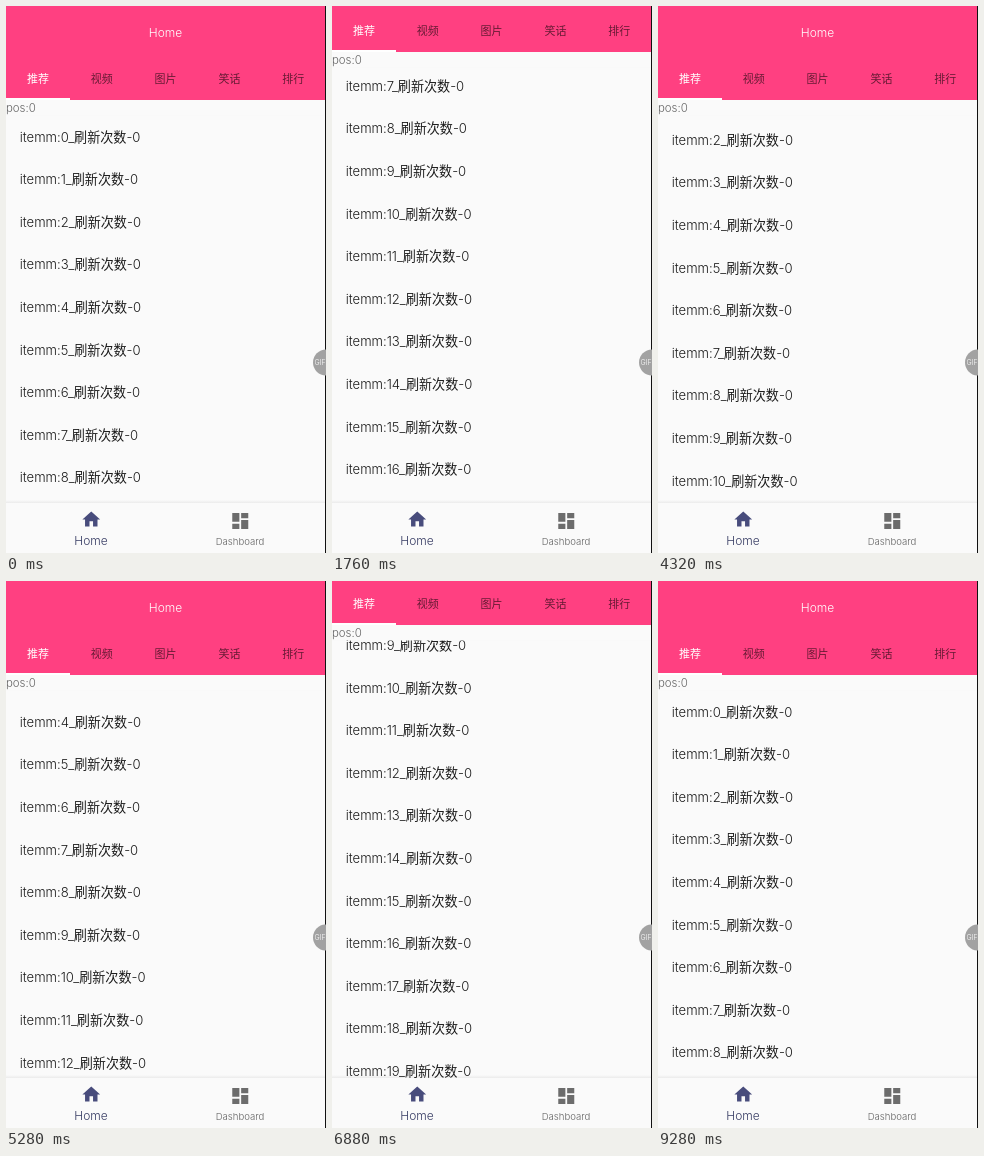
Write an HTML page that moves like this. It is 320x547 px and loops after 9600 ms.

```html
<!DOCTYPE html>
<html lang="zh-CN">
<head>
<meta charset="utf-8">
<title>Home</title>
<style>
  html, body { margin: 0; width: 100%; height: 100%; overflow: hidden; background: #fafafa; }
  svg { display: block; width: 100vw; height: 100vh; }
  text { font-family: Inter, "Noto Sans CJK SC", "Noto Sans CJK", sans-serif; font-weight: 300; white-space: pre; }
  .mid { text-anchor: middle; }
  #tabs text { font-weight: 400; fill: rgba(0, 0, 0, .6); }
  #tabs text:first-child { fill: #fff; }
</style>
</head>
<body>
<svg viewBox="0 0 320 547">
  <defs>
    <linearGradient id="shade" x2="0" y2="1">
      <stop offset="0" stop-color="#000" stop-opacity="0"/>
      <stop offset="1" stop-color="#000" stop-opacity=".06"/>
    </linearGradient>
  </defs>
  <rect width="320" height="547" fill="#fafafa"/>
  <g id="list" font-size="13.1" fill="#1c1c1c"></g>

  <g id="header">
    <rect y="90" width="319" height="19.5" fill="#fafafa"/>
    <text x="0" y="105.8" font-size="11.4" fill="#666">pos:0</text>
    <rect width="319" height="94" fill="#ff4081"/>
    <text class="mid" x="159.5" y="31" font-size="12" fill="#fff">Home</text>
    <g id="tabs" class="mid" font-size="11"></g>
    <rect y="92" width="64" height="2" fill="#fff"/>
  </g>

  <rect y="494" width="319" height="3" fill="url(#shade)"/>
  <rect y="497" width="319" height="50" fill="#fafafa"/>
  <g transform="translate(74.6 502.8) scale(.889)" fill="#484c7c">
    <path d="M10 20v-6h4v6h5v-8h3L12 3 2 12h3v8z"/>
  </g>
  <text class="mid" x="85" y="538.7" font-size="12" fill="#353a62">Home</text>
  <g transform="translate(223.6 504.3) scale(.889)" fill="#6c6c6c">
    <path d="M3 13h8V3H3v10zm0 8h8v-6H3v6zm10 0h8V11h-8v10zm0-18v6h8V3h-8z"/>
  </g>
  <text class="mid" x="234" y="538.6" font-size="9.6" fill="#666">Dashboard</text>

  <rect x="319" width="1" height="547" fill="#111"/>
  <circle cx="320" cy="356.5" r="13" fill="#a2a2a2"/>
  <text x="308.5" y="359" font-size="7" fill="#fff">GIF</text>
</svg>
<script>
const LOOP = 9600, STEP = 160, ROW = 42.6, ROWS = 20;
const list = document.getElementById('list');
const header = document.getElementById('header');
const tabs = document.getElementById('tabs');

// Each gesture ends at a list scroll and a header shift; a nudge springs back.
const gestures = [
  { start: 800, steps: 7, scroll: 301, shift: 48 },
  { start: 1920, steps: 2, scroll: 330, shift: 50 },
  { start: 2400, steps: 4, scroll: 60.5, shift: 0 },
  { start: 3360, steps: 3, scroll: 60.5, shift: 0, nudge: 16 },
  { start: 4160, steps: 6, scroll: 125, shift: 0 },
  { start: 5280, steps: 6, scroll: 336.4, shift: 0 },
  { start: 6400, steps: 4, scroll: 400, shift: 50 },
  { start: 7360, steps: 7, scroll: 436.4, shift: 50 },
  { start: 8480, steps: 6, scroll: 0, shift: 0 }
];

function addText(parent, x, y, content) {
  const node = document.createElementNS('http://www.w3.org/2000/svg', 'text');
  node.setAttribute('x', x);
  node.setAttribute('y', y);
  node.textContent = content;
  parent.append(node);
}

['推荐', '视频', '图片', '笑话', '排行'].forEach((label, i) =>
  addText(tabs, 32 + i * 63.8, 76.5, label));

for (let i = 0; i < ROWS; i++) {
  addText(list, 13.7, 135.6 + i * ROW, `itemm:${i}_刷新次数-0`);
}

const mix = (from, to, k) => from + (to - from) * k;

// The list follows the finger evenly; the header reacts late in the gesture.
function poseAt(time) {
  let scroll = 0, shift = 0;
  for (const g of gestures) {
    if (time < g.start) break;
    const k = Math.min(1, ((time - g.start) / STEP + 1) / g.steps);
    scroll = mix(scroll, g.scroll, k);
    shift = mix(shift, g.shift, k ** 5) + (g.nudge || 0) * Math.sin(Math.PI * k);
  }
  return { scroll, shift };
}

function draw(time) {
  const { scroll, shift } = poseAt(Math.floor(time % LOOP / STEP) * STEP);
  const top = -Math.round(shift);
  header.setAttribute('transform', `translate(0 ${top})`);
  list.setAttribute('transform', `translate(0 ${top - scroll})`);
}

const start = performance.now();
function tick() {
  draw(performance.now() - start);
  requestAnimationFrame(tick);
}
tick();
</script>
</body>
</html>
```
